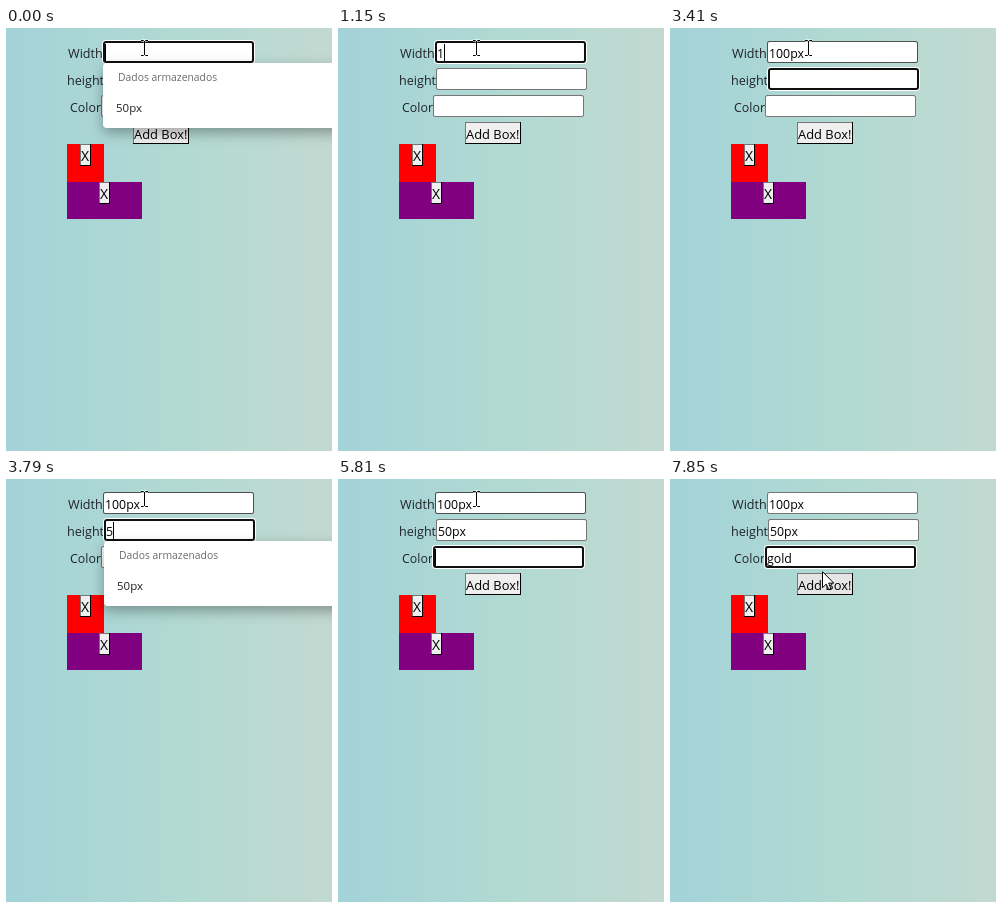
Write an HTML page with a canvas that moves like this. It is 326 by 423 pixels and loops after 8 s.

```html
<!DOCTYPE html>
<html lang="pt">
<head>
<meta charset="utf-8">
<style>
  html, body { margin: 0; width: 100%; height: 100%; overflow: hidden; }
  canvas { display: block; }
</style>
</head>
<body>
<canvas id="stage" width="326" height="423"></canvas>
<script>
const ctx = document.getElementById('stage').getContext('2d');
const LOOP = 8000;
const FONT = '"Open Sans", "Noto Sans", sans-serif';

const fields = [
  { label: 'Width', labelX: 62, size: 12.6, x: 97, y: 13 },
  { label: 'height', labelX: 61, size: 12.6, x: 98, y: 40 },
  { label: 'Color', labelX: 64, size: 12.4, x: 95, y: 67 },
];

// [start ms, focused field, typed text, caret shown, suggestions open]
const steps = [
  [0, 0, '', 1, 1], [530, 0, '', 0, 1], [1030, 0, '1', 1, 1],
  [1150, 0, '1', 1, 0], [1270, 0, '10', 1, 0], [1520, 0, '100', 1, 0],
  [2040, 0, '100', 0, 0], [2540, 0, '100p', 1, 0], [2660, 0, '100px', 1, 0],
  [2910, 1, '', 1, 0], [3410, 1, '', 0, 0], [3790, 1, '5', 1, 1],
  [3910, 1, '50', 1, 1], [4160, 1, '50p', 1, 1], [4280, 1, '50px', 1, 0],
  [4800, 2, '', 1, 0], [5310, 2, '', 0, 0], [5810, 2, '', 1, 0],
  [6440, 2, '', 0, 0], [6810, 2, 'g', 1, 0], [7060, 2, 'go', 1, 0],
  [7210, 2, 'gol', 1, 0], [7330, 2, 'gold', 1, 0], [7850, 2, 'gold', 0, 0],
];
const filled = ['100px', '50px'];

function rect(x, y, w, h, color) {
  ctx.fillStyle = color;
  ctx.fillRect(x, y, w, h);
}

function round(x, y, w, h, r, color) {
  ctx.fillStyle = color;
  ctx.beginPath();
  ctx.roundRect(x, y, w, h, r);
  ctx.fill();
}

function text(str, x, y, size, color = '#212529') {
  ctx.font = `${size}px ${FONT}`;
  ctx.fillStyle = color;
  ctx.fillText(str, x, y);
}

function button(label, x, y, w, size, face = '#efefef') {
  rect(x, y, w, 22, '#000');
  rect(x, y, w - 1, 21, '#767676');
  rect(x + 1, y + 1, w - 2, 20, face);
  text(label, x + 1, y + 17, size, '#000');
}

function field(f, value, focused, hovered, caret) {
  const { x, y } = f;
  text(f.label, f.labelX, y + 17, f.size);
  if (focused) {
    round(x - 1, y - 1, 153, 24, 4, '#fff');
    round(x, y, 151, 22, 3, '#101010');
    round(x + 2, y + 2, 147, 18, 1, '#fff');
  } else {
    round(x, y, 151, 22, 2.5, hovered ? '#4f4f4f' : '#767676');
    round(x + 1, y + 1, 149, 20, 1.5, '#fff');
  }
  text(value, x + 2, y + 17, 12.35, '#000');
  if (caret) rect(Math.round(x + 2 + ctx.measureText(value).width), y + 3, 1, 17, '#000');
}

function suggestions({ x, y }) {
  ctx.save();
  ctx.shadowColor = 'rgba(0,0,0,.32)';
  ctx.shadowBlur = 13;
  ctx.shadowOffsetY = 5;
  round(x, y + 22, 300, 65, 4, '#fff');
  ctx.restore();
  text('Dados armazenados', x + 15, y + 40, 10.35, '#6b6b6b');
  text('50px', x + 13, y + 71, 11.5, '#202124');
}

function beam(x, y) {
  const path = new Path2D(`M${x - 3} ${y + .5}h2.5l1 1l1 -1h2.5M${x + .5} ${y + 1}v14M${x - 3} ${y + 15.5}h2.5l1 -1l1 1h2.5`);
  ctx.lineWidth = 2.5;
  ctx.strokeStyle = 'rgba(255,255,255,.7)';
  ctx.stroke(path);
  ctx.lineWidth = 1;
  ctx.strokeStyle = '#000';
  ctx.stroke(path);
}

function arrow(x, y) {
  const path = new Path2D(`M${x + .5} ${y + .7}v16l3.7 -3.6l2.5 5.4l2.3 -1l-2.4 -5.4h5.2z`);
  ctx.fillStyle = '#fff';
  ctx.fill(path);
  ctx.lineWidth = 1;
  ctx.strokeStyle = '#000';
  ctx.stroke(path);
}

function draw(t) {
  const [, focus, typed, caret, open] = steps.findLast(s => s[0] <= t);
  const hover = t < 7730 ? 0 : t < 7850 ? 1 : 3;

  const sky = ctx.createLinearGradient(0, 0, 326, 0);
  sky.addColorStop(0, '#a3d2d8');
  sky.addColorStop(.55, '#b2dad2');
  sky.addColorStop(1, '#c2d9d1');
  rect(0, 0, 326, 423, sky);

  rect(61, 116, 37, 38, '#f00');
  rect(61, 154, 75, 37, '#800080');
  button('X', 74, 116, 11, 14);
  button('X', 93, 154, 11, 14);
  button('Add Box!', 127, 94, 56, 12.9, hover === 3 ? '#e5e5e5' : '#efefef');

  fields.forEach((f, i) => {
    const value = i === focus ? typed : i < focus ? filled[i] : '';
    field(f, value, i === focus, i === hover, i === focus && caret);
  });
  if (open) suggestions(fields[focus]);

  if (hover === 3) arrow(152, 92);
  else beam(hover ? 142 : 138, hover ? 44 : 12);
}

function tick() {
  draw(performance.now() % LOOP);
  requestAnimationFrame(tick);
}
tick();
</script>
</body>
</html>
```
